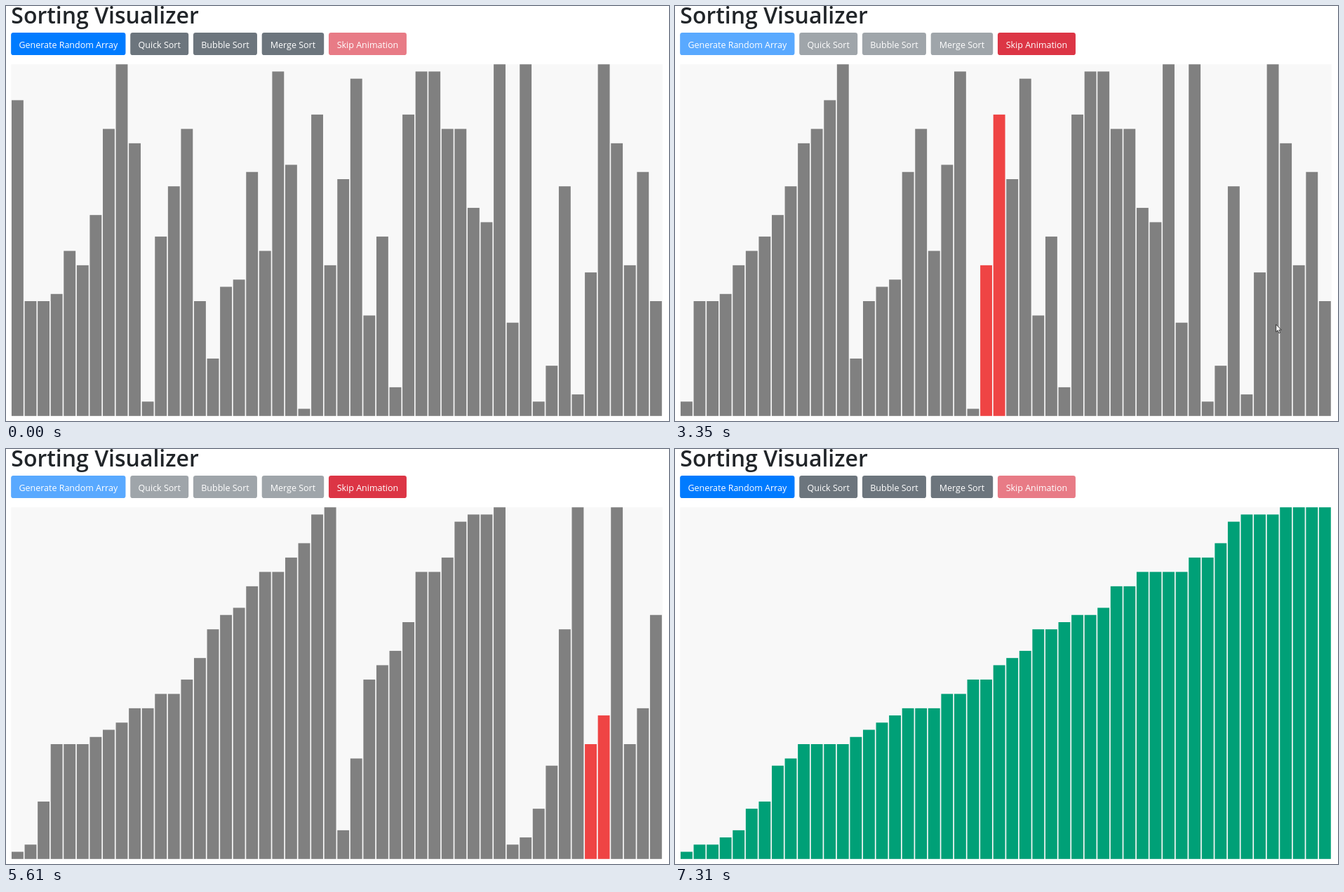
Animation, 945 px wide and 592 px high, one loop 8160 ms. Source, as an HTML page with a canvas:

```html
<!DOCTYPE html>
<html lang="en">
<head>
<meta charset="utf-8">
<title>Sorting Visualizer</title>
<style>
  html, body { margin: 0; width: 100%; height: 100%; overflow: hidden; background: #fff; }
  canvas { display: block; }
</style>
</head>
<body>
<canvas width="945" height="592"></canvas>
<script>
const ctx = document.querySelector('canvas').getContext('2d');
const LOOP = 8160, START = 1900, END = 7310;
const FONT = '"Open Sans", "Noto Sans", sans-serif';
const GREY = '#808080', RED = '#ef4444', GREEN = '#00a077';
const LEFT = 7.15, TOP = 83.2, BOTTOM = 584.8, PITCH = 18.57;

// The unsorted input
const values = [
  44, 16, 16, 17, 23, 21, 28, 40, 49, 38, 2, 25, 32, 40, 16, 8, 18, 19, 34, 23, 48, 35, 1, 42, 21,
  33, 47, 14, 25, 4, 42, 48, 48, 40, 40, 29, 27, 49, 13, 49, 2, 7, 32, 3, 20, 49, 38, 21, 34, 16];
const UNIT = (BOTTOM - TOP) / Math.max(...values);

// Each merge writes its range in red, then recolours it bar by bar.
const steps = [];
function mergeSort(lo, hi) {
  if (lo === hi) return [values[lo]];
  const mid = (lo + hi) >> 1;
  const merged = [...mergeSort(lo, mid), ...mergeSort(mid + 1, hi)].sort((a, b) => a - b);
  const done = merged.length === values.length ? GREEN : GREY;
  for (const color of [RED, done]) {
    merged.forEach((value, k) => steps.push({ i: lo + k, value, color }));
  }
  return merged;
}
mergeSort(0, values.length - 1);

const clamp = v => Math.max(0, Math.min(1, v));
const mix = (a, b, f) => a + (b - a) * f;

// Interpolates key points [time, ...numbers]; null outside their span.
function along(points, t, ease = f => f) {
  const k = points.findIndex(p => t < p[0]);
  if (k < 1) return null;
  const from = points[k - 1], to = points[k];
  const f = ease((t - from[0]) / (to[0] - from[0]));
  return from.slice(1).map((v, i) => mix(v, to[i + 1], f));
}

// Time against sorting steps done
const pace = [[2000, 0], [3350, 148], [5610, 388], [END, steps.length]];

function stepsDone(t) {
  if (t >= END) return steps.length;
  const done = along(pace, t);
  return done ? Math.floor(done[0] + 0.6) : 0;
}

function drawBars(t) {
  const bars = values.map(value => ({ value, color: GREY }));
  for (const step of steps.slice(0, stepsDone(t))) bars[step.i] = step;
  ctx.fillStyle = '#f8f8f8';
  ctx.fillRect(LEFT, TOP, PITCH * bars.length, BOTTOM - TOP);
  bars.forEach(({ value, color }, i) => {
    ctx.fillStyle = color;
    ctx.fillRect(LEFT + 0.85 + PITCH * i, BOTTOM, 16.88, -UNIT * value);
  });
}

function drawText(text, x, y, font, color, align) {
  ctx.font = `${font} ${FONT}`;
  ctx.fillStyle = color;
  ctx.textAlign = align;
  ctx.fillText(text, x, y);
}

function drawHeader(t) {
  drawText('Sorting Visualizer', 7.3, 25, '600 32px', '#212529', 'left');

  const idle = t < START || t >= END;
  const hover = clamp((t - 1050) / 150) * clamp((START + 150 - t) / 150);
  const grey = '#6c757d';
  const hovered = `rgb(${mix(108, 90, hover)}, ${mix(117, 98, hover)}, ${mix(125, 104, hover)})`;
  let x = LEFT;
  const button = (label, width, color, enabled = idle) => {
    ctx.globalAlpha = enabled ? 1 : 0.65;
    ctx.fillStyle = color;
    ctx.beginPath();
    ctx.roundRect(x, 38.1, width, 32, 3.4);
    ctx.fill();
    ctx.globalAlpha = 1;
    drawText(label, x + width / 2, 59.5, '500 12.5px', '#fff', 'center');
    x += width + 6.75;
  };
  button('Generate Random Array', 163.3, '#007bff');
  button('Quick Sort', 83, grey);
  button('Bubble Sort', 91, grey);
  button('Merge Sort', 88.5, hovered);
  button('Skip Animation', 111, '#dc3545', !idle);
}

// Pointer: time, x, y
const path = [
  [380, 869, 565], [1180, 406, 53], [2050, 406, 53],
  [2440, 453.5, 122], [3350, 856.5, 454], [3750, 936, 592]];
const arrow = new Path2D('M0 0V10.5L2.4 8.3L4.2 12.4L6 11.6L4.2 7.7H7.6Z');
const hand = new Path2D('M0 1Q1.2-.6 2.4 1V5L7 6Q8.4 6.4 8.2 8L7.4 13H1L-3 8Q-2.6 6.4 0 8Z');

function drawPointer(t) {
  const slowDown = f => f * (2 - f);
  const at = along(path, t, t < START ? slowDown : undefined);
  if (!at) return;
  const shape = t < START && at[1] < 70 ? hand : arrow;
  ctx.save();
  ctx.translate(...at);
  ctx.fillStyle = '#fff';
  ctx.strokeStyle = '#222';
  ctx.lineWidth = 0.9;
  ctx.fill(shape);
  ctx.stroke(shape);
  ctx.restore();
}

function draw() {
  const t = performance.now() % LOOP;
  ctx.fillStyle = '#fff';
  ctx.fillRect(0, 0, 945, 592);
  drawHeader(t);
  drawBars(t);
  drawPointer(t);
  requestAnimationFrame(draw);
}
draw();
</script>
</body>
</html>
```
